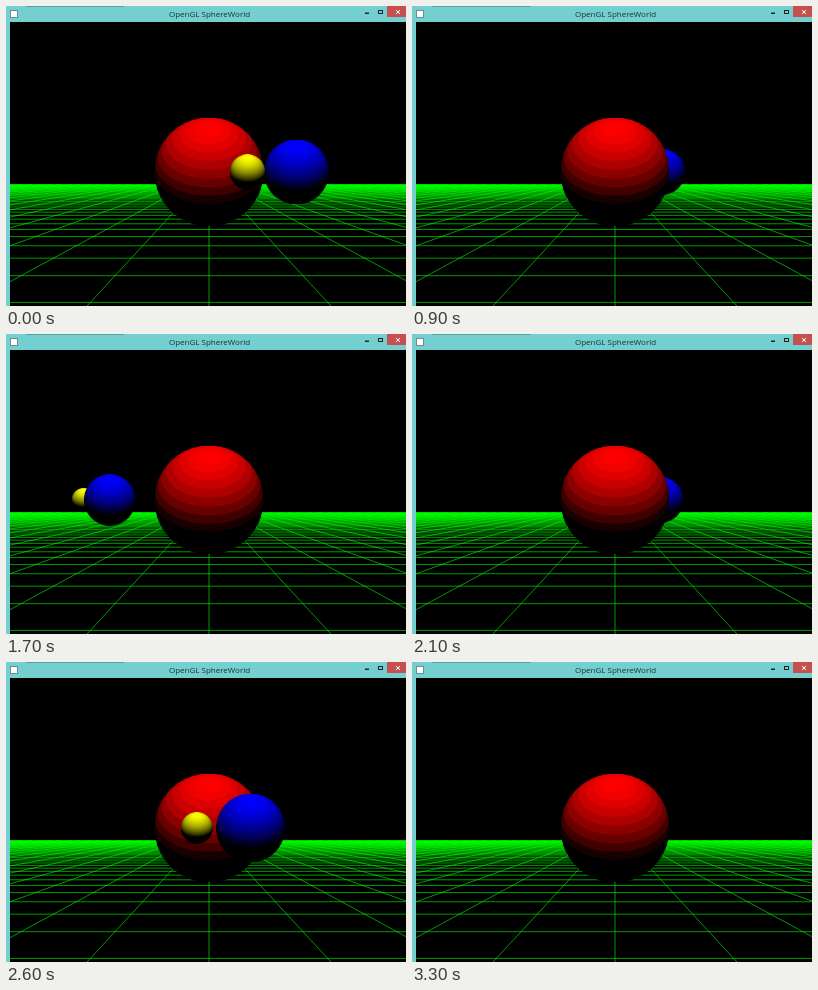
An HTML page with a canvas for the animation above (3.4 s loop, 400 by 300 pixels).

```html
<!DOCTYPE html>
<html>
<head>
<meta charset="utf-8">
<style>
html, body { margin: 0; width: 100%; height: 100%; overflow: hidden; background: #000; }
canvas { display: block; }
</style>
</head>
<body>
<canvas id="stage" width="400" height="300"></canvas>
<script>
const LOOP = 3400, STEP = 100;
const CX = 203, CY = 166, FOCAL = 500, DIST = 18.35;   // camera for the balls
const HORIZON = 168, DROP = 1220, CELL = 2.5, HALF = 100, SLANT = 0.924;   // ground grid
const LEFT = 4, TOP = 16;                              // window frame
const LIGHT = { y: 0.81, z: 0.586 };
// Orbit angle of the blue sphere, in degrees, at given steps
const ORBIT = [[0, 42.3], [4, -85], [12, -336.7], [16, -465.5], [23, -648], [28, -784], [32, -899]];
const RAD = Math.PI / 180;

const ctx = document.getElementById('stage').getContext('2d');
ctx.imageSmoothingQuality = 'high';

function makeCanvas(w, h) {
  const c = document.createElement('canvas');
  c.width = w;
  c.height = h;
  return c;
}

// Diffuse-lit ball, shaded in bands of equal angle from the light
function makeBall(red, green, blue, band) {
  const R = 100, size = 2 * R, c = makeCanvas(size, size), g = c.getContext('2d');
  const img = g.createImageData(size, size);
  for (let j = 0; j < size; j++) {
    for (let i = 0; i < size; i++) {
      const x = (i + 0.5 - R) / R, y = (R - j - 0.5) / R, d = 1 - x * x - y * y;
      if (d < 0) continue;
      const lit = Math.min(1, y * LIGHT.y + Math.sqrt(d) * LIGHT.z);
      const angle = Math.round(Math.acos(lit) / RAD / band) * band;
      const v = 255 * Math.max(0, Math.cos(angle * RAD));
      img.data.set([red * v, green * v, blue * v, 255], (j * size + i) * 4);
    }
  }
  g.putImageData(img, 0, 0);
  return c;
}

function makeScene() {
  const c = makeCanvas(400, 300), g = c.getContext('2d');
  const line = (x1, y1, x2, y2) => {
    g.beginPath();
    g.moveTo(x1, y1);
    g.lineTo(x2, y2);
    g.stroke();
  };
  const box = (color, x, y, w, h) => {
    g.fillStyle = color;
    g.fillRect(x, y, w, h);
  };
  box('#000', 0, 0, 400, 300);

  g.strokeStyle = '#0f0';
  g.lineWidth = 0.6;
  const middle = 14.5, near = DROP / 9, far = DROP / (middle + HALF);
  for (let p = -HALF; p <= HALF; p += CELL) {
    const dx = p / CELL * SLANT, z = middle + p;
    line(CX + dx * near, HORIZON + near, CX + dx * far, HORIZON + far);
    if (z > 9) line(0, HORIZON + DROP / z, 400, HORIZON + DROP / z);
  }

  // Window frame
  box('#74d0d0', 0, 0, 400, TOP);
  box('#74d0d0', 0, 0, LEFT, 300);
  box('#5f9ea0', 20, 0, 98, 1);
  box('#6f8f8f', 4, 4, 8, 8);
  box('#fff', 5, 5, 6, 6);
  box('#c84f50', 381, 0, 19, 11);
  box('#222', 359, 6.5, 4, 1.5);
  g.lineWidth = 1;
  g.strokeStyle = '#222';
  g.strokeRect(372.5, 4.5, 4, 3);
  g.strokeStyle = '#fff';
  line(390, 4, 394, 8);
  line(394, 4, 390, 8);
  g.fillStyle = '#1c3030';
  g.font = '8px "Open Sans", sans-serif';
  g.textAlign = 'center';
  g.fillText('OpenGL SphereWorld', 203.5, 11);
  return c;
}

function orbitAngle(step) {
  let i = 1;
  while (i < ORBIT.length - 1 && ORBIT[i][0] < step) i++;
  const [s0, a0] = ORBIT[i - 1], [s1, a1] = ORBIT[i];
  return (a0 + (a1 - a0) * (step - s0) / (s1 - s0)) * RAD;
}

const scene = makeScene();
const redBall = makeBall(1, 0, 0, 9.4);
const blueBall = makeBall(0, 0, 1, 6);
const yellowBall = makeBall(1, 1, 0, 6);

function draw(step) {
  const a = orbitAngle(step), b = 3 * a + Math.PI;
  const x = 4 * Math.sin(a), z = 4 * Math.cos(a);
  const balls = [
    { img: redBall, size: 2, x: 0, z: 0 },
    { img: blueBall, size: 1, x, z },
    { img: yellowBall, size: 0.5, x: x + 2 * Math.sin(b), z: z + 2 * Math.cos(b) }
  ];
  ctx.drawImage(scene, 0, 0);
  ctx.save();
  ctx.beginPath();
  ctx.rect(LEFT, TOP, 400 - LEFT, 300 - TOP);
  ctx.clip();
  for (const o of balls.sort((p, q) => p.z - q.z)) {
    const scale = FOCAL / (DIST - o.z), r = o.size * scale;
    ctx.drawImage(o.img, CX + o.x * scale - r, CY - r, 2 * r, 2 * r);
  }
  ctx.restore();
}

let shown = -1;
function tick() {
  const t = performance.now() % LOOP;
  const step = Math.max(0, Math.floor(t / STEP) - 1);   // first pose lasts two steps
  if (step !== shown) draw(shown = step);
  requestAnimationFrame(tick);
}
tick();
</script>
</body>
</html>
```
